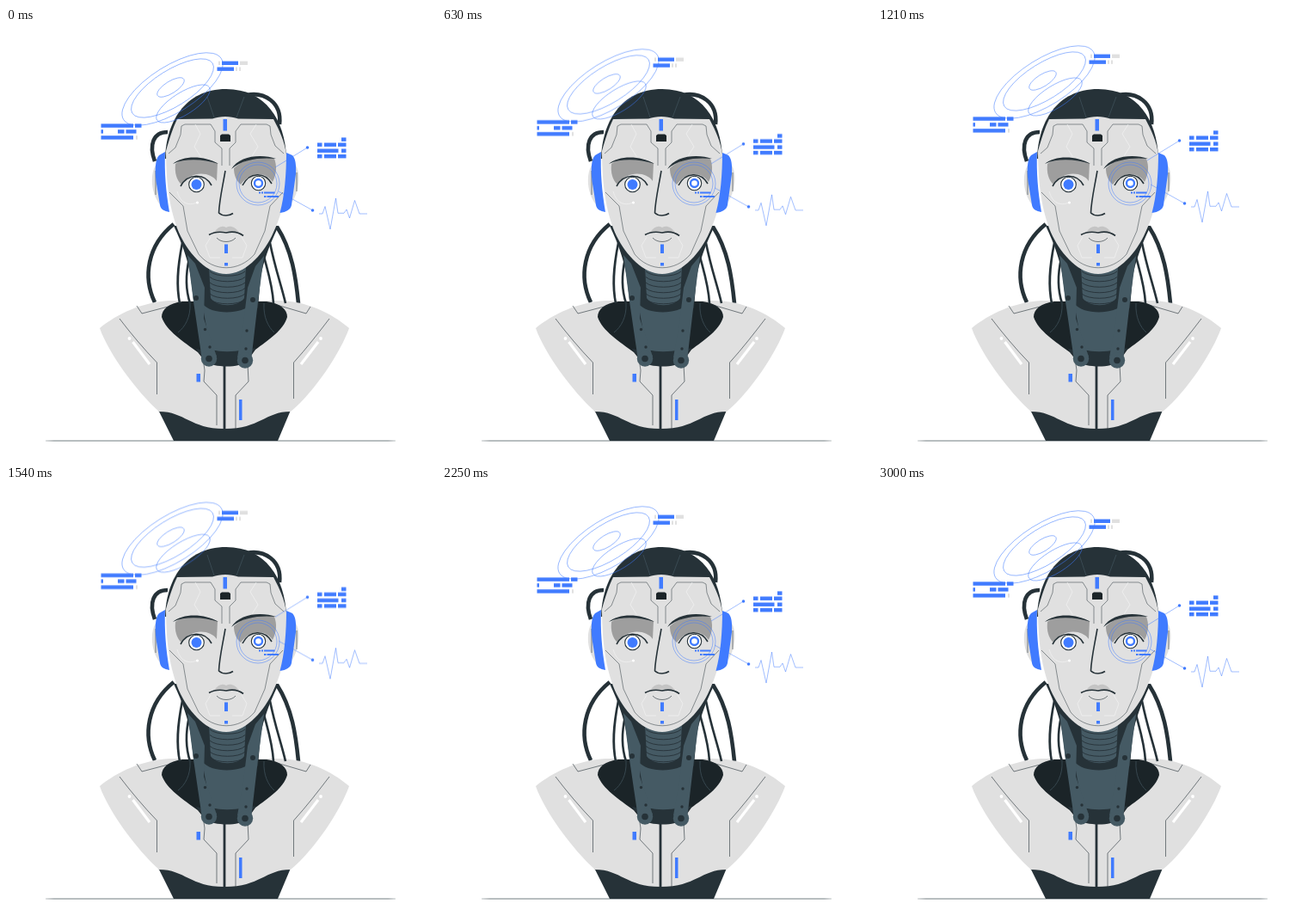
Animation of 500 by 500 pixels, one loop 3.04 s. Source, as an HTML page:

```html
<!DOCTYPE html>
<html lang="en">
<head>
<meta charset="utf-8">
<title>Android portrait</title>
<style>
  html, body { margin: 0; width: 100%; height: 100%; overflow: hidden; background: #fff; }
  svg { display: block; width: 100vw; height: 100vh; }
  .ink { fill: #263238; }
  .deep { fill: #1b2428; }
  .steel { fill: #455a64; }
  .skin { fill: #e0e0e0; }
  .shade { fill: #9e9e9e; }
  .blue { fill: #407bff; }
  .white { fill: #fff; }
  .line { fill: none; stroke: #263238; stroke-width: .6; }
  .bold { stroke-width: 1.6; }
  .pale { fill: none; stroke: #f2f2f2; stroke-width: .7; }
  .glow { fill: none; stroke: #407bff; stroke-width: .5; }
  .cable { fill: none; stroke: #263238; stroke-width: 4.6; }
  .wire { fill: none; stroke: #263238; stroke-width: 2.6; }
  .float { animation: float 3040ms linear infinite; }
  /* rise and fall take 3000 ms, then a 40 ms rest */
  @keyframes float {
    0%, 98.684%, 100% { transform: translateY(0); }
    49.342% { transform: translateY(-10px); }
  }
</style>
</head>
<body>
<svg viewBox="0 0 500 500">
  <path d="M46 480 L56 479.5 H444 L453 480 L444 480.5 H56Z" fill="#8c9397" stroke="#a5abae" stroke-width=".4"/>

  <g id="cables">
    <path class="cable" d="M188 121 C171 121 166 136 173 155"/>
    <path class="cable" d="M280 78 C300 74 321 86 318 112"/>
    <path class="cable" d="M195 228 C164 253 159 290 173 319"/>
    <path class="cable" d="M315 231 C333 259 337 290 340 320"/>
  </g>

  <g id="bust">
    <path class="ink" d="M176 442 L195 480 H316 L332 442Z"/>
    <path class="skin" d="M109 349 C130 332 158 319 190 317 H317 C348 317 378 331 399 349 C389 377 359 423 331 446 C301 446 296 466 254 466 C214 466 208 446 178 446 C153 424 119 378 109 349Z"/>
    <path class="deep" d="M181 336 C181 327 189 320 205 318 H303 C319 320 327 327 327 336 C323 351 305 363 290 374 L278 391 H234 L223 377 C207 365 186 352 181 336Z"/>
    <path class="ink" d="M221 373 C240 377 271 377 290 372 L280 388 C272 395 242 396 231 387Z"/>
    <path class="ink" d="M252.6 392 H255.4 V466 H252.6Z"/>
    <g class="line">
      <path d="M152 323 L158 332 L196 322 M354 324 L349 332 L315 322"/>
      <path d="M132 338 C145 355 160 373 175.5 389 V426"/>
      <path d="M376 338 C363 355 349 373 334.5 389 V431"/>
      <path d="M230 391 L231 398 L230 411 L245 427 V462"/>
      <path d="M281 391 L282 411 L267 427 V466"/>
    </g>
    <path d="M147.5 365 L167 391 M363 365 L343 391" stroke="#fff" stroke-width="3.2"/>
    <circle class="white" cx="143.5" cy="361" r="1.9"/>
    <circle class="white" cx="366" cy="361" r="1.9"/>
    <rect class="blue" x="221.5" y="402" width="4.5" height="9.5"/>
    <rect class="blue" x="271" y="432" width="3.5" height="24"/>
  </g>

  <g id="neck">
    <path class="wire" d="M205 250 C199 280 198 300 202 320 M213 268 C208 290 209 305 214 320 M307 250 C313 280 319 295 325 320 M300 266 C305 285 310 300 311 320"/>
    <path d="M214 320 C215 336 208 348 200 354 M300 320 C299 336 305 348 312 354" fill="none" stroke="#37474f" stroke-width="1"/>
    <path class="ink" d="M195 230 C206 253 212 272 215 290 L219 325 L230 346 H283 L293 325 L296 290 C299 272 306 253 317 230Z"/>
    <path class="steel" d="M228 320 C238 334 275 334 286 320 L277 374 C264 377 250 377 238 374Z"/>
    <path class="steel" d="M236 276 H279 L277 314 C270 325 245 325 238 314Z"/>
    <g id="rings" class="line" style="stroke-width:.9"></g>
    <path class="steel" d="M211 264 L220 274 L231 302 L230 338 L245 382 L228 386 L218 318Z"/>
    <path class="steel" d="M300 265 L290 277 L281 302 L276 344 L269 383 L285 387 L293 318Z"/>
    <circle class="steel" cx="236" cy="384.5" r="9.2"/>
    <circle class="steel" cx="278" cy="386.5" r="9.2"/>
    <g id="bolts" class="ink"></g>
  </g>

  <g id="head">
    <path class="skin" d="M178 156 C167 162 167 191 179 205Z M335 158 C343 164 342 188 333 202Z"/>
    <path class="line" d="M174 166 V194 M338 168 V190"/>
    <path class="ink" d="M185 152 C186 111 207 71 256 71 C302 71 324 107 326 150Z"/>
    <path d="M234 80 L242 104 M277 80 L268 104" fill="none" stroke="#455a64" stroke-width=".6"/>
    <path class="skin" d="M199 106 L240 105.5 C249 102 261 102 270 105.5 L311 106 C318 119 324 132 326 147 C328 190 322 215 309 242 C297 266 277 286 256 286 C234 286 214 264 203 242 C192 218 186 187 186 143 C190 129 194 116 199 106Z"/>
    <path class="blue" d="M185 144 L178 148 C173.500 152 173 165 174.500 178 L179 206 C180 211 184 213 190 214 C186 190 184 168 185 144Z"/>
    <path class="blue" d="M326 145 L333 148 C337 152 337.500 160 337 170 L332 206 C331 211 326 214 318.500 215 C324 195 326 170 326 145Z"/>

    <g class="line" style="stroke-width:.5">
      <path d="M189 146 L197 139 L203 124 L204 114 L208 112 H238 L243 120 V133 L251 140 V160"/>
      <path d="M323 146 L313 137 L308 124 L307 114 L303 112 H273 L267 120 V133 L260 140 V160"/>
      <path d="M190 191 L206 207 L211 236 L224 263 C241 284 271 284 289 263 L301 236 L307 207 L322 191"/>
    </g>
    <g class="pale">
      <path d="M220 112 L226 123 L219 138 L226 149 M291 112 L284 123 L293 138 L286 149"/>
      <path d="M238 243 L232 253 L237 267 H249 M274 243 L280 253 L275 267 H263"/>
      <path d="M199 190 C203 204 212 207 222 203"/>
    </g>
    <circle class="white" cx="222.500" cy="203" r="1.500"/>
    <rect class="blue" x="252.500" y="106" width="4.500" height="13.500"/>
    <path class="deep" d="M249 125 L251 123.500 H259 L261 125 V132 H249Z"/>

    <path class="shade" d="M197 158 C207 150 231 150 246 157 L245 178 C237 166 214 166 204 182 C198 176 196 168 197 158Z"/>
    <path class="shade" d="M265 163 C278 151 299 149 312 152 C315 160 315 169 310 179 C301 165 282 168 273 182 C267 177 265 170 265 163Z"/>
    <path class="ink" d="M194 158 C205 148 231 148 247 158 C230 152.500 209 151 194 158Z M262 164 C271 148 298 146 314 152 C296 150.500 276 152 262 164Z"/>
    <path class="line bold" d="M203 184 C211 169 231 168 239 183 M275 183 C283 167 301 167 309 181"/>
    <g stroke="#263238" stroke-width="1.100">
      <circle class="white" cx="221.500" cy="182" r="8.800"/>
      <circle class="white" cx="293.500" cy="180.500" r="8.200"/>
    </g>
    <circle class="blue" cx="221.500" cy="182" r="6"/>
    <circle cx="293.500" cy="180.500" r="4.500" fill="none" stroke="#407bff" stroke-width="2.400"/>

    <path class="line bold" d="M255 166 C252 184 248 200 247.500 215 C252 219 259 219 264 215.500"/>
    <path d="M242 237.500 C246 232 251 229 256 232 C261 229 267 232 271 237.500 C262 236 251 236 242 237.500Z" fill="#c4c4c4"/>
    <path class="line bold" d="M236 240.500 C244 236 251 237 256 238 C262 236.500 270 237 276 241.500"/>
    <path class="line" d="M245 244 C250 250 262 250 267 244"/>
    <rect class="blue" x="254" y="251.500" width="4" height="10.500"/>
    <rect class="blue" x="254" y="273" width="4" height="3.500"/>
  </g>

  <g id="scanner">
    <circle class="glow" cx="293" cy="181" r="25"/>
    <circle class="glow" cx="293" cy="181" r="22"/>
    <path class="blue" d="M294 190.500 h2 v2 h-2z M297 190.500 h2 v2 h-2z M300 190.500 h12.500 v2 h-12.500z M300 195 h2.500 v2 h-2.500z M303.500 195 h13.500 v2 h-13.500z"/>
  </g>

  <g class="float">
    <g class="glow" id="halo"></g>
    <g id="bars"></g>
    <path class="glow" d="M313 162 L350.500 139 M317 190 L356.500 212"/>
    <circle class="blue" cx="350.500" cy="139" r="1.800"/>
    <circle class="blue" cx="356.500" cy="212" r="1.800"/>
    <path class="glow" d="M364 216 H368 L371 207.500 L377 234 L383.500 198 L386 215.300 H393 L396 211 L399.500 221 L405.500 200.500 L411 216 H420"/>
  </g>
</svg>
<script>
  const add = (id, tag, attrs) => {
    const node = document.createElementNS('http://www.w3.org/2000/svg', tag);
    for (const key in attrs) node.setAttribute(key, attrs[key]);
    document.getElementById(id).append(node);
  };

  for (let y = 283; y < 316; y += 6.5)
    add('rings', 'path', { d: `M237 ${y} C244 ${y + 7} 271 ${y + 7} 278 ${y}` });

  // x, y, radius
  [[221, 314, 3], [287, 316, 3], [231.5, 350.5, 1.7], [280, 352, 1.7],
   [237, 371, 1.7], [279, 373, 1.7], [236, 384.5, 3.8], [278, 386.5, 3.8]]
    .forEach(([cx, cy, r]) => add('bolts', 'circle', { cx, cy, r }));

  // x, y, long radius, short radius
  [[193.5, 71, 67, 27], [193.5, 70, 55, 21], [191.5, 69, 18, 7], [206, 88, 36, 13]]
    .forEach(([x, y, rx, ry]) =>
      add('halo', 'ellipse', { rx, ry, transform: `translate(${x} ${y}) rotate(-32)` }));

  const row = (y, fill, ...spans) => spans.forEach(([from, to]) =>
    add('bars', 'rect', { x: from, y, width: to - from, height: 4.4, fill }));
  const BLUE = '#407bff', GREY = '#e0e0e0';

  row(111.4, BLUE, [110.5, 148], [150, 157.5]);
  row(118.2, BLUE, [110.5, 113], [130, 137.5], [139.5, 151.5]);
  row(125.2, BLUE, [110.5, 148]);
  row(125.2, GREY, [151, 153]);
  row(38.6, BLUE, [251, 270]);
  row(38.6, GREY, [247, 249], [272, 281]);
  row(45.5, BLUE, [245.5, 265]);
  row(45.5, GREY, [267, 269], [271, 273]);
  row(127.4, BLUE, [390, 395.5]);
  row(133.5, BLUE, [362, 367.5], [370, 384], [386, 395.5]);
  row(140.5, BLUE, [362, 386.5], [390, 395.5]);
  row(147, BLUE, [362, 367.5], [370, 384], [386, 395.5]);
</script>
</body>
</html>
```
